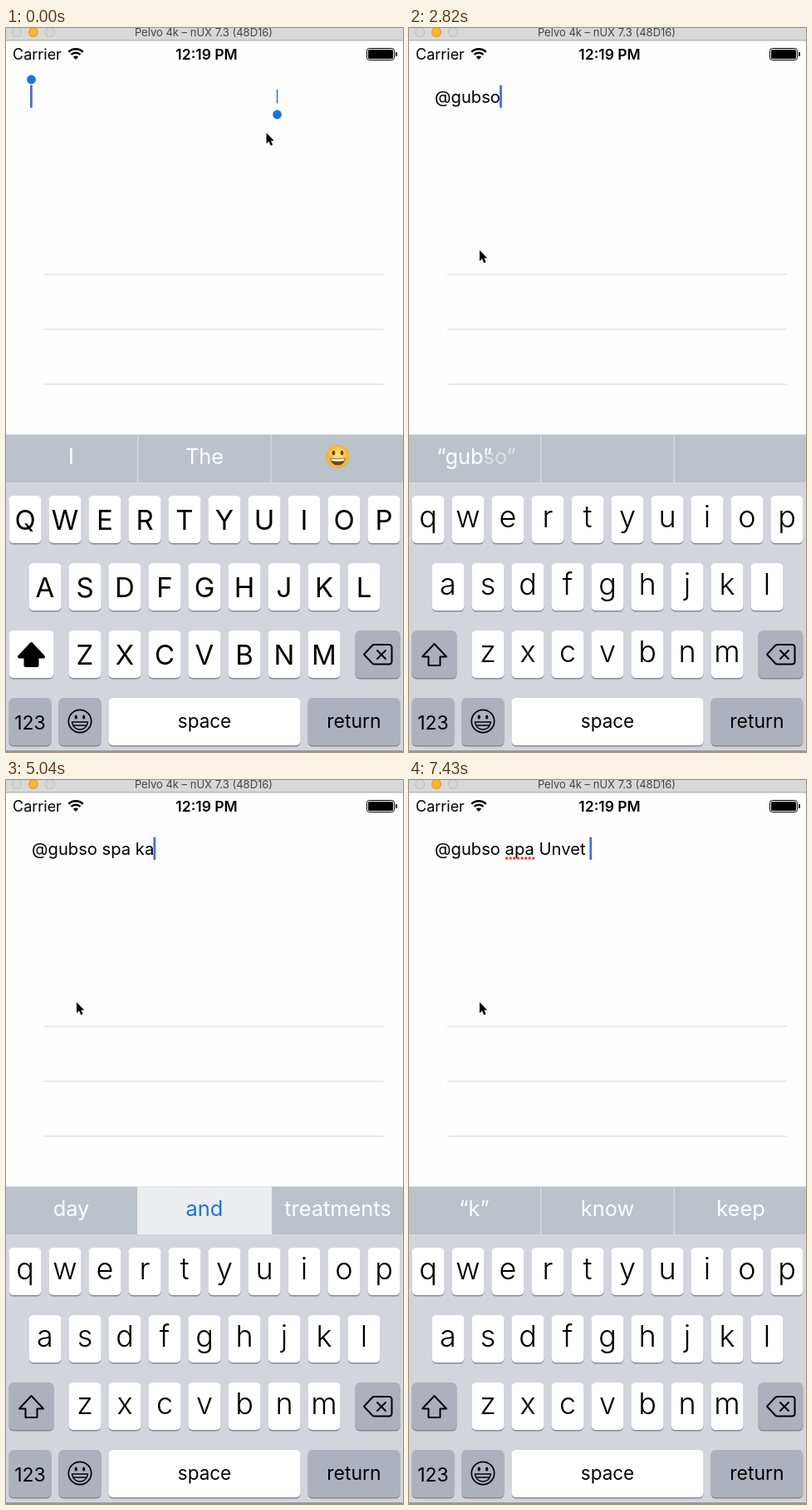
An HTML page with a canvas for the animation above (8000 ms loop, 478 px wide and 870 px high).

```html
<!DOCTYPE html>
<html lang="en">
<head>
<meta charset="utf-8">
<title>Mention typing</title>
<style>
  html, body { margin: 0; width: 478px; height: 870px; overflow: hidden; background: #fefefe; }
  canvas { display: block; }
</style>
</head>
<body>
<canvas id="stage" width="478" height="870"></canvas>
<script>
const ctx = document.getElementById('stage').getContext('2d');
const LOOP = 8000;
const BLUE = '#1a73e3', KEY_GRAY = '#adb1be', BAR = '#bbc2ca';
const NAME = '@gubso';
const NONE = ['', '', ''];

const start = {
  text: '', caret: 1, handles: true, upper: true, match: false, underline: false,
  words: ['I', 'The', '😀'], chosen: false, blend: false, pointer: [313.5, 126]
};

// Each step changes part of the state at its time in ms.
const steps = [
  [140, { handles: false }],
  [590, { caret: .5 }],
  [740, { caret: 0 }],
  [890, { text: '@', caret: 1 }],
  [1040, { upper: false, words: NONE }],
  [1190, { text: '@g' }],
  [1340, { match: true }],
  [1490, { words: ['“g”', '', ''] }],
  [1640, { caret: .4 }],
  [1790, { caret: 0 }],
  [2080, { caret: 1 }],
  [2230, { pointer: [245, 170] }],
  [2380, { pointer: [145, 232] }],
  [2530, { pointer: [85, 267] }],
  [2670, { text: NAME, match: false }],
  [2820, { blend: true }],
  [2970, { blend: false, words: ['“gubso”', '', ''] }],
  [3120, { caret: .6 }],
  [3420, { text: NAME + ' ', caret: 1 }],
  [3570, { words: ['the', 'to', 'I'] }],
  [3720, { text: NAME + ' a' }],
  [3860, { text: NAME + ' ap' }],
  [4010, { text: NAME + ' apa' }],
  [4310, { words: ['“apa”', 'spa', 'app'] }],
  [4460, { chosen: true }],
  [4610, { text: NAME + ' spa ' }],
  [4750, { words: ['day', 'and', 'treatments'] }],
  [4900, { text: NAME + ' spa k' }],
  [5040, { text: NAME + ' spa ka' }],
  [5190, { text: NAME + ' spa k' }],
  [5340, { words: NONE, chosen: false }],
  [5480, { words: ['“k”', 'know', 'keep'] }],
  [5630, { text: NAME + ' spa ' }],
  [5780, { text: NAME + ' spa' }],
  [5930, { text: NAME + ' s' }],
  [6080, { text: NAME + ' ' }],
  [6230, { text: NAME + ' ap' }],
  [6380, { text: NAME + ' apa' }],
  [6680, { text: NAME + ' apa u', underline: true }],
  [6830, { text: NAME + ' apa un' }],
  [6980, { text: NAME + ' apa unv' }],
  [7280, { text: NAME + ' apa unvet' }],
  [7430, { text: NAME + ' apa Unvet ' }]
];

function setFont(size, weight = 400) {
  ctx.font = `${weight} ${size}px Inter, Roboto, sans-serif`;
}

function label(text, x, y, size, { color = '#000', weight = 400, align = 'center' } = {}) {
  setFont(size, weight);
  ctx.textAlign = align;
  ctx.fillStyle = color;
  ctx.fillText(text, x, y);
}

function rect(x, y, w, h, color) {
  ctx.fillStyle = color;
  ctx.fillRect(x, y, w, h);
}

function round(x, y, w, h, r, color) {
  ctx.beginPath();
  ctx.roundRect(x, y, w, h, r);
  ctx.fillStyle = color;
  ctx.fill();
}

function disc(x, y, rx, color, ry = rx) {
  ctx.beginPath();
  ctx.ellipse(x, y, rx, ry, 0, 0, 7);
  ctx.fillStyle = color;
  ctx.fill();
}

function shape(d, { x = 0, y = 0, fill, stroke, width = 2 }) {
  const path = new Path2D(d);
  ctx.save();
  ctx.translate(x, y);
  ctx.lineJoin = ctx.lineCap = 'round';
  ctx.lineWidth = width;
  if (stroke) { ctx.strokeStyle = stroke; ctx.stroke(path); }
  if (fill) { ctx.fillStyle = fill; ctx.fill(path); }
  ctx.restore();
}

function drawBars() {
  rect(0, 0, 478, 15, '#d8d8d8');
  rect(0, 14, 478, 1.5, '#b9b9b9');
  ['#bfbfbf', '#e09a22', '#bfbfbf'].forEach((edge, i) => {
    disc(13 + 20 * i, 5, 6, edge);
    disc(13 + 20 * i, 5, 5, i === 1 ? '#fdb52c' : '#d6d6d6');
  });
  label('Pelvo 4k – nUX 7.3 (48D16)', 238, 10, 13, { color: '#444' });

  label('Carrier', 8, 38, 18, { align: 'left' });
  label('12:19 PM', 241.5, 38, 17.5, { weight: 600 });
  ctx.strokeStyle = '#000';
  ctx.lineWidth = 2.5;
  for (const r of [12.3, 7.8]) {
    ctx.beginPath();
    ctx.arc(84, 37.5, r, -Math.PI * .75, -Math.PI * .25);
    ctx.stroke();
  }
  shape('M84 38L80.8 34.8Q84 32 87.2 34.8Z', { fill: '#000' });

  ctx.lineWidth = 1;
  ctx.beginPath();
  ctx.roundRect(434.5, 24.5, 33, 14, 3);
  ctx.stroke();
  round(436, 26, 30, 11, 1.5, '#000');
  round(469, 29, 2, 5, 1, '#000');
}

function drawEditor(s) {
  const left = 31;
  label(s.text, left, 90, 20.2, { align: 'left' });
  const end = left + ctx.measureText(s.text).width;
  if (s.underline) {
    const from = left + ctx.measureText(NAME + ' ').width;
    const to = from + ctx.measureText('apa').width;
    ctx.save();
    ctx.strokeStyle = '#f23b30';
    ctx.lineWidth = 3.4;
    ctx.lineCap = 'round';
    ctx.setLineDash([0, 4.6]);
    ctx.beginPath();
    ctx.moveTo(from + 2, 94);
    ctx.lineTo(to, 94);
    ctx.stroke();
    ctx.restore();
  }
  ctx.globalAlpha = s.caret;
  round(s.text ? end - .8 : 29, 68.5, 2.8, 27.5, 1, '#4a6be6');
  ctx.globalAlpha = 1;
  if (s.handles) {
    disc(30.5, 62, 5.4, BLUE);
    rect(325.8, 74, 1.5, 16.5, BLUE);
    disc(326.5, 104, 5.4, BLUE);
  }
  if (s.match) label(NAME, 46, 271, 22.6, { align: 'left' });
  for (const y of [296, 362, 428]) rect(46, y - .5, 409, 1.2, '#dedee0');
}

function drawGrin(x, y) {
  const glow = ctx.createRadialGradient(x, y - 3, 3, x, y, 14);
  glow.addColorStop(0, '#ffe06a');
  glow.addColorStop(1, '#f4ae2c');
  disc(x, y, 14, glow);
  for (const dx of [-5, 5]) disc(x + dx, y - 4.5, 1.9, '#654116', 2.7);
  shape('M-9.5 1.5Q0 3.5 9.5 1.5Q8 10.5 0 10.5T-9.5 1.5Z', { x, y, fill: '#75431b' });
  shape('M-8.5 2.3Q0 4 8.5 2.3L7.5 5Q0 6.5 -7.5 5Z', { x, y, fill: '#fff' });
}

function drawSuggestions(s) {
  const size = 25.4, baseline = 524;
  rect(0, 488.5, 478, 57.5, BAR);
  if (s.chosen) rect(158, 488.5, 162, 57.5, '#ebedee');
  else for (const x of [158, 318.5]) rect(x, 488.5, 1.3, 57.5, '#d9dde1');
  if (s.blend) {
    setFont(size);
    const x = 81 - ctx.measureText('“gubso”').width / 2;
    label('“gub”', x, baseline, size, { color: '#fff', align: 'left' });
    label('“gubso”', x, baseline, size, { color: '#ffffff80', align: 'left' });
    return;
  }
  s.words.forEach((word, i) => {
    const x = [78.5, 239, 399.5][i];
    if (word === '😀') drawGrin(x, 515);
    else label(word, x, baseline, size, { color: s.chosen && i === 1 ? BLUE : '#fff' });
  });
}

function key(x, y, w, color = '#fff') {
  round(x, y + 1.6, w, 57, 5.5, '#888b91');
  round(x, y, w, 57, 5.5, color);
}

function drawKeyboard(s) {
  rect(0, 546, 478, 324, '#d2d5db');
  rect(0, 868, 478, 2, '#96999d');
  [['qwertyuiop', 3.5, 562], ['asdfghjkl', 27.5, 643], ['zxcvbnm', 75.5, 724]].forEach(([row, left, y]) => {
    [...row].forEach((c, i) => {
      const x = left + 48 * i;
      key(x, y, 39);
      if (s.upper) label(c.toUpperCase(), x + 19.5, y + 41, 33);
      else label(c, x + 19.5, y + 38, 36, { weight: 300 });
    });
  });

  key(3.5, 724, 54, s.upper ? '#fff' : KEY_GRAY);
  shape('M30.5 740L45 755.5H37.5V766H23.5V755.5H16Z',
    { stroke: '#000', width: s.upper ? 4 : 2, fill: s.upper && '#000' });

  key(420.5, 724, 54, KEY_GRAY);
  shape('M431 752.8L441 742Q442 741 443.5 741H461Q464.5 741 464.5 744.5V761Q464.5 764.5 461 764.5H443.5Q442 764.5 441 763.5Z',
    { stroke: '#000' });
  shape('M447 748L457 758M457 748L447 758', { stroke: '#000' });

  key(3.5, 805, 51, KEY_GRAY);
  key(63.5, 805, 51, KEY_GRAY);
  key(123.5, 805, 231);
  key(363.5, 805, 111, KEY_GRAY);
  label('123', 29, 843, 23);
  label('space', 239, 841, 22.5);
  label('return', 419, 841, 23);

  ctx.beginPath();
  ctx.arc(89, 833, 13.7, 0, 7);
  ctx.strokeStyle = '#000';
  ctx.lineWidth = 1.7;
  ctx.stroke();
  for (const x of [84.3, 93.7]) disc(x, 828, 1.7, '#000', 2.6);
  shape('M79.5 834H98.5Q97 843 89 843T79.5 834ZM81 838H97', { stroke: '#000', width: 1.5 });
}

function drawPointer([x, y]) {
  shape('M0 0V13L3 10.3L5.2 15.3L7.6 14.3L5.4 9.4H9.3Z', { x, y, stroke: '#fff', fill: '#000' });
}

function frame(now) {
  const t = now % LOOP;
  const state = Object.assign({}, start, ...steps.filter(([at]) => at <= t).map(([, change]) => change));
  rect(0, 0, 478, 870, '#fefefe');
  drawBars();
  drawEditor(state);
  drawSuggestions(state);
  drawKeyboard(state);
  drawPointer(state.pointer);
}

const began = performance.now();
function tick() {
  frame(performance.now() - began);
  requestAnimationFrame(tick);
}
tick();
</script>
</body>
</html>
```
